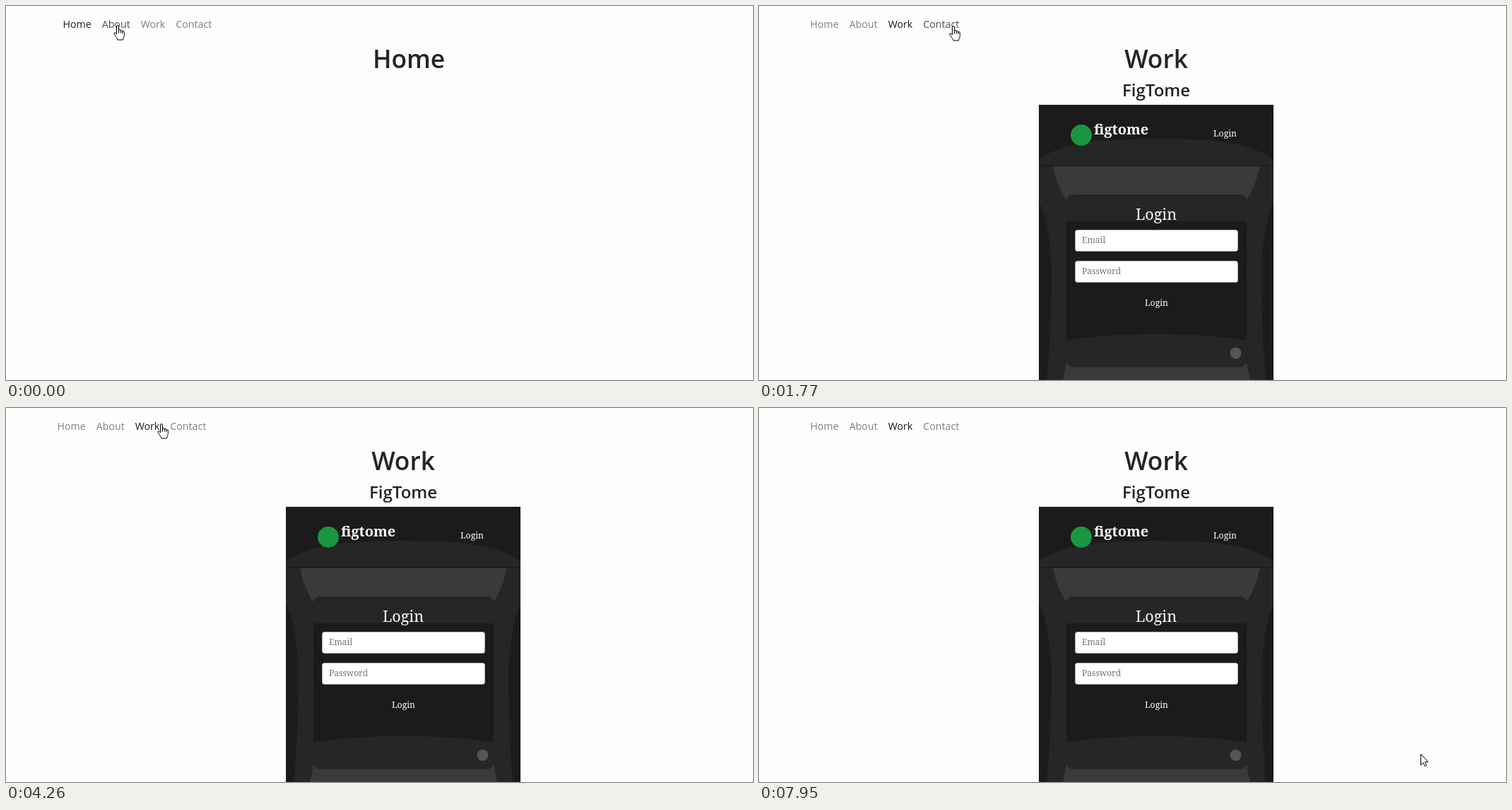
An HTML page with a canvas for the animation above (8000 ms loop, 1057 by 530 pixels).

```html
<!DOCTYPE html>
<html lang="en">
<head>
<meta charset="utf-8">
<title>Portfolio walkthrough</title>
<style>
  html, body { margin: 0; width: 100%; height: 100%; overflow: hidden; background: #fefefe; }
  canvas { display: block; }
</style>
</head>
<body>
<canvas id="stage" width="1057" height="530"></canvas>
<script>
const ctx = document.getElementById('stage').getContext('2d');
const LOOP = 8000, STEP = 145;
const SANS = '"Open Sans", "Noto Sans", sans-serif';
const SERIF = '"Noto Serif", serif';
const INK = '#212529', BLUE = '#007bff', PAPER = '#fefefe';
const DARK = '#1b1b1b', MID = '#262626', LIGHT = '#3a3a3a';
const NAV_FONT = '14.2px ' + SANS, NAV_GAP = 15;

const LINKS = ['Home', 'About', 'Work', 'Contact'];
const VISITS = [[0, 'Home'], [150, 'About'], [1110, 'Work'], [2450, 'Contact'], [4260, 'Work']];

// Straight pointer strokes: start, end, and the point reached
const REST = { x: 157, y: 27 };
const GLIDES = [
  { from: 150, to: 390, x: 219, y: 27 },
  { from: 1230, to: 1360, x: 274, y: 28 },
  { from: 3450, to: 3700, x: 219, y: 22 },
  { from: 4260, to: 4410, x: 352, y: 72 },
  { from: 4410, to: 4660, x: 503, y: 208 },
  { from: 4810, to: 5240, x: 377, y: 119 },
  { from: 5980, to: 6350, x: 352, y: 100 },
  { from: 6910, to: 7950, x: 936, y: 490 }
];

const HAND = new Path2D('M5 13V2a1.5 1.5 0 0 1 3 0v5.5a1.4 1.4 0 0 1 2.8 .4v.6a1.3 1.3 0 0 1 2.6 .5v.7' +
  'a1.2 1.2 0 0 1 2.4 .5v4.3c0 2.5-1.8 3.5-1.8 6.5h-7.5c0-2-3.2-5-4.9-8.2c-.8-1.6 .6-2.8 1.9-1.6z' +
  'M8 7.5v4M10.8 8v3.5M13.4 9v3');
const ARROW = new Path2D('M.5 .5V16L4 12.7L6.3 17.7L8.6 16.6L6.4 11.6H10.8z');

function text(str, x, y, font, color, align = 'left') {
  ctx.font = font;
  ctx.fillStyle = color;
  ctx.textAlign = align;
  ctx.fillText(str, x, y);
}

function fill(path, color) {
  ctx.fillStyle = color;
  ctx.fill(typeof path === 'string' ? new Path2D(path) : path);
}

function rect(x, y, w, h, color) {
  ctx.fillStyle = color;
  ctx.fillRect(x, y, w, h);
}

function box(x, y, w, h, r, color) {
  const p = new Path2D();
  p.roundRect(x, y, w, h, r);
  fill(p, color);
  return p;
}

function disc(x, y, r, color) {
  const p = new Path2D();
  p.arc(x, y, r, 0, Math.PI * 2);
  fill(p, color);
}

function title(str, x) {
  text(str, x, 88, '600 35.3px ' + SANS, INK, 'center');
}

// The pointer is caught only every STEP or so, hence the jumps
function pointerAt(t) {
  let { x, y } = REST;
  for (const g of GLIDES) {
    if (t < g.from) break;
    const span = g.to - g.from;
    const n = Math.round(span / STEP);
    const p = Math.floor(Math.min(1, (t - g.from) / span) * n) / n;
    x += (g.x - x) * p;
    y += (g.y - y) * p;
  }
  return { x, y };
}

// Draws the links and tells whether one is under the pointer
function nav(page, left, { x, y }) {
  let anyHover = false;
  ctx.font = NAV_FONT;
  for (const name of LINKS) {
    const width = ctx.measureText(name).width;
    const pad = NAV_GAP / 2;
    const hover = y > 6 && y < 46 && x >= left - pad && x < left + width + pad;
    const alpha = name === page ? 0.9 : hover ? 0.7 : 0.5;
    text(name, left, 31, NAV_FONT, `rgba(0,0,0,${alpha})`);
    left += width + NAV_GAP;
    anyHover ||= hover;
  }
  return anyHover;
}

function field(label, y) {
  const p = box(447.5, y + 0.5, 230, 30, 3, '#fff');
  ctx.strokeStyle = '#a9adb1';
  ctx.lineWidth = 1;
  ctx.stroke(p);
  text(label, 457, y + 19, '12px ' + SERIF, '#6c757d');
}

function loginScreen() {
  ctx.save();
  ctx.beginPath();
  ctx.rect(396, 140, 332, 390);
  ctx.clip();
  rect(396, 140, 332, 390, DARK);
  fill('M396 217Q425 197 480 191Q562 185 644 191Q699 197 728 217V530H396z', MID);
  rect(396, 225.5, 332, 1.3, DARK);

  fill('M416 227H709Q702 258 688 278V300H437V278Q422 258 416 227z', LIGHT);
  fill('M396 276Q411 310 414 370Q414 460 407 530H396z', DARK);
  fill('M728 278Q714 310 711 370Q711 460 717 530H728z', DARK);
  fill('M435 506H690L695 530H430z', LIGHT);

  box(435, 267, 255, 245, 9, MID);
  fill('M435 305H690V474Q640 465 562 465Q485 465 435 474z', DARK);

  disc(456, 183, 15, '#1a9641');
  text('figtome', 474, 182, '900 20px ' + SERIF, '#fff');
  text('Login', 659.5, 185, '12.2px ' + SERIF, '#fff', 'center');
  text('Login', 562, 303, '21.5px ' + SERIF, '#fff', 'center');
  field('Email', 317);
  field('Password', 361);
  text('Login', 562.5, 425, '12.2px ' + SERIF, '#fff', 'center');
  disc(674.5, 492, 8, '#555');
  ctx.restore();
}

function icons() {
  disc(511, 122, 19.5, BLUE);
  rect(534, 102.5, 35, 35, BLUE);

  box(572, 107.5, 40, 30, 4, BLUE);
  ctx.strokeStyle = PAPER;
  ctx.lineWidth = 2.5;
  ctx.stroke(new Path2D('M571 115L585.5 125.3Q592 132.3 598.5 125.3L613 115'));

  fill('M633 104V114Q633 115.6 635 115.6H644.8V139.2Q644.8 141 643 141H619Q617 141 617 139.2V106Q617 104 619 104z', BLUE);
  fill('M635.5 104H636L644.8 112.8V113.3H635.5z', BLUE);
  for (let i = 0; i < 3; i++) rect(624, 120.2 + i * 4.7, 14, 2.2, PAPER);
}

const VIEWS = {
  Home() { title('Home', 570); },
  About() {
    title('About Me', 570);
    text('I am currently a full time student enrolled in the Tall-Field Reed Coding Workshop ' +
      'at the University of North Carolina Charlotte.', 570, 119, '14px ' + SANS, INK, 'center');
  },
  Work() {
    title('Work', 562);
    text('FigTome', 562, 128, '600 24px ' + SANS, INK, 'center');
    loginScreen();
  },
  Contact() {
    title('Contact', 570);
    icons();
  }
};

function drawPointer({ x, y }, isHand) {
  const shape = isHand ? HAND : ARROW;
  ctx.save();
  ctx.translate(Math.round(x) - (isHand ? 5.5 : 0), Math.round(y));
  fill(shape, '#fff');
  ctx.strokeStyle = '#000';
  ctx.lineWidth = 1;
  ctx.lineJoin = 'round';
  ctx.stroke(shape);
  ctx.restore();
}

function draw(t) {
  const page = VISITS.findLast(([since]) => since <= t)[1];
  const pos = pointerAt(t);
  const onWork = page === 'Work';
  const onImage = onWork && pos.x >= 396 && pos.x < 728 && pos.y >= 140;

  rect(0, 0, 1057, 530, PAPER);
  const onLink = nav(page, onWork ? 72.5 : 80.5, pos);
  VIEWS[page]();
  drawPointer(pos, onLink || onImage);
}

const start = performance.now();
function tick() {
  draw((performance.now() - start) % LOOP);
  requestAnimationFrame(tick);
}
tick();
</script>
</body>
</html>
```
